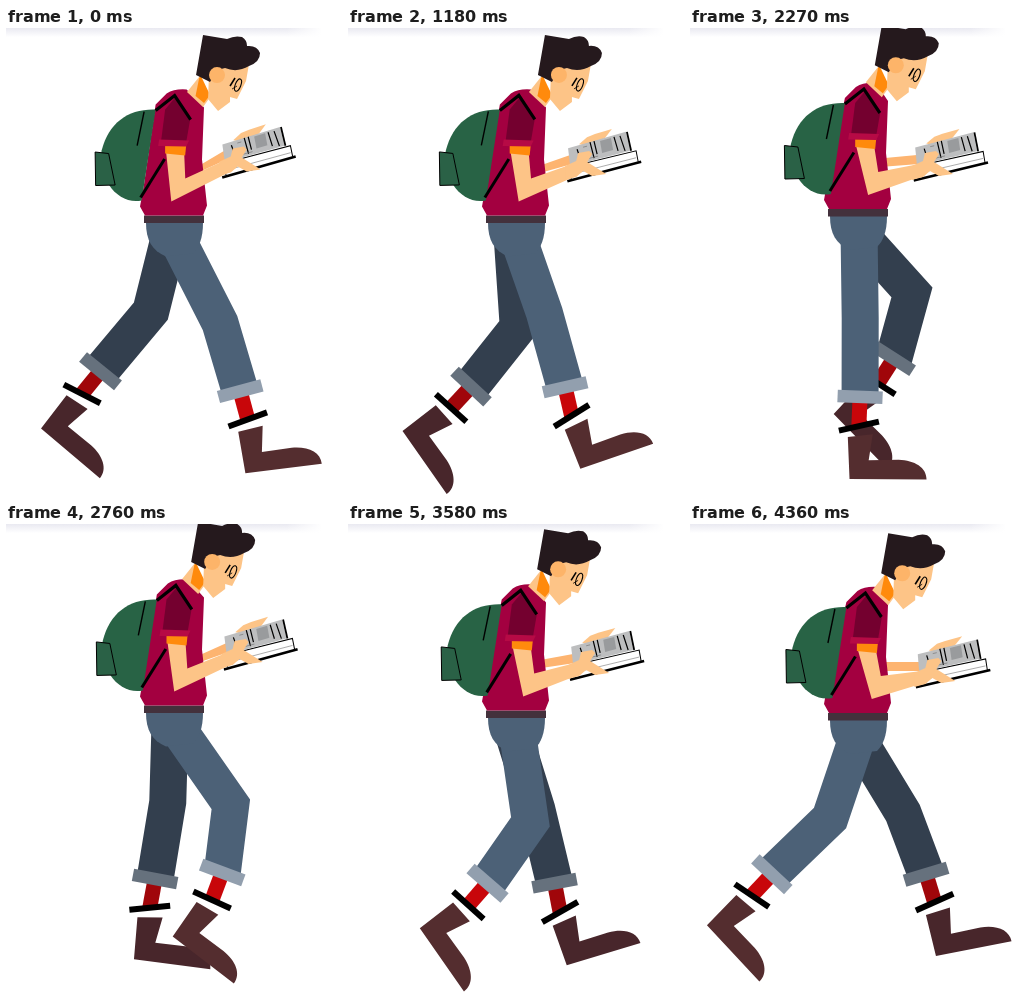
Animation of 336x468 px, one loop 4.39 s. Source, as an HTML page with a canvas:

```html
<!DOCTYPE html>
<html lang="en">
<head>
<meta charset="utf-8">
<title>Walking reader</title>
<style>
  html, body { margin: 0; width: 100%; height: 100%; overflow: hidden; background: #fff; }
  canvas { display: block; width: 336px; height: 468px; }
</style>
</head>
<body>
<canvas id="stage" width="336" height="468"></canvas>
<script>
const ctx = document.getElementById('stage').getContext('2d');
const LOOP = 4390, STRIDE = 952;
const RAD = Math.PI / 180;

// phase, knee x, knee y, cuff x, cuff y, calf angle, foot angle
const STEPS = [
  [0, 214, 295, 234, 363, -15, -7],
  [.08, 218, 289, 241, 350, -17, -11],
  [.204, 200, 285, 224, 359, -15, -21],
  [.26, 194, 285, 212, 359, -11, -17],
  [.286, 186, 285, 200, 358, -6, -11],
  [.384, 170.5, 290, 171, 369, 2, 0],
  [.399, 167, 278, 155, 355, 10, 7],
  [.5, 150, 283, 100, 343, 39, 40],
  [.58, 140, 294, 82, 350, 43, 47],
  [.704, 166, 300, 114, 356, 45, 55],
  [.7605, 182, 298, 139, 359, 41, 55],
  [.786, 198, 293, 165, 357, 38, 54],
  [.884, 227, 264, 208, 330, 33, 46],
  [.899, 225, 280, 216, 348, 21, 38]
];
// half-cycle phase, body drop
const BOB = [[0, 6.5], [.08, 8], [.204, 7.5], [.26, 5.5], [.286, 3.5], [.384, 0], [.399, .4]];

const NEAR = { dx: 0, leg: '#4c6177', cuff: '#929fae', calf: '#c8060a', boot: '#542d2f' };
const FAR = { dx: -5, leg: '#333f4e', cuff: '#66717d', calf: '#a0060a', boot: '#48262b' };
const SKIN = '#fdc487', ORANGE = '#ff8a0c', HAIR = '#25191d';

// smooth periodic interpolation without overshoot
function sample(keys, period, u) {
  u = ((u % period) + period) % period;
  const n = keys.length;
  const key = i => {
    const turn = Math.floor(i / n);
    const k = keys[i - turn * n].slice();
    k[0] += turn * period;
    return k;
  };
  let i = n - 1;
  while (i > 0 && keys[i][0] > u) i--;
  const [a, b, c, d] = [key(i - 1), key(i), key(i + 1), key(i + 2)];
  const w = c[0] - b[0], x = (u - b[0]) / w;
  const slope = (p, q, j) => (q[j] - p[j]) / (q[0] - p[0]);
  const blend = (m, k) => m * k > 0 ? 2 * m * k / (m + k) : 0;
  return b.slice(1).map((v, j) => {
    j++;
    const mid = slope(b, c, j);
    const m0 = blend(slope(a, b, j), mid) * w, m1 = blend(mid, slope(c, d, j)) * w;
    const x2 = x * x, x3 = x2 * x;
    return (2 * x3 - 3 * x2 + 1) * v + (x3 - 2 * x2 + x) * m0
      + (3 * x2 - 2 * x3) * c[j] + (x3 - x2) * m1;
  });
}

function fill(d, color) {
  ctx.fillStyle = color;
  ctx.fill(new Path2D(d));
}
function line(d, width, color = '#000') {
  ctx.strokeStyle = color;
  ctx.lineWidth = width;
  ctx.stroke(new Path2D(d));
}
function group(x, y, angle, draw) {
  ctx.save();
  ctx.translate(x, y);
  ctx.rotate(angle * RAD);
  draw();
  ctx.restore();
}

function leg(side, u, bob) {
  const [kx, ky, ax, ay, calf, foot] = sample(STEPS, 1, u);
  const knee = kx + side.dx, ankle = ax + side.dx;
  const sin = Math.sin(calf * RAD), cos = Math.cos(calf * RAD);
  group(ankle, ay, calf, () => fill('M-7.5 0H7.5V30H-7.5Z', side.calf));
  group(ankle - 29.5 * sin, ay + 29.5 * cos, foot, () => {
    fill('M-11 11L14 8L10 34L40 33.5C56 34 68 41 68 53H-9Z', side.boot);
    group(0, 0, -13, () => fill('M-20.5 -3H20.5V3H-20.5Z', '#000'));
  });
  line(`M${169 + side.dx} ${200 + bob}L${knee} ${ky}L${ankle} ${ay}`, 37, side.leg);
  group(ankle, ay, calf, () => fill('M-22.5 -6H22.5V6.5H-22.5Z', side.cuff));
}

function hips() {
  fill('M140 188H197C197 204 193 213 187 219L160 222C146 216 140 206 140 188Z', NEAR.leg);
  fill('M138 181H198V188.5H138Z', '#43313c');
}

function torso(s) {
  const k = 3.5 * s;
  fill(`M${153 + k} 70L${164 + k} 59Q${172 + k} 54 ${184 + k} 55L198 73L196 125L201 171L197 181H139L134 172L138 150Z`, '#a30040');
}

function pack() {
  fill('M153 75L139 166C115 171 94 143 99 116C106 88 126 74 153 75Z', '#286345');
  fill('M92.5 117.5L106 119L112.5 150.5L93 151Z', '#2a6146');
  line('M92.5 117.5L106 119L112.5 150.5L93 151Z', 1);
  line('M141.500 77L134.500 111', 1.4);
  line('M162 124.500L138 163', 3);
}

function farArm(s) {
  const hx = 5.5 * s, hy = 7.3 * s;
  fill(`M195 130L${224 + hx} ${123 + hy}L${226 + hx} ${132 + hy}L190 139Z`, '#fdb470');
}

function book() {
  fill('M233 112L241 105L249 102L266 97L259 106L243 114Z', SKIN);
  fill('M222 134L290 118L292 130L224 147Z', '#fff');
  line('M222 135L290 119L292 130M222 135L225 147', 1);
  line('M225 142L290 126', .8, '#999');
  line('M221 149L295 130', 2.6);
  fill('M222 116L280 100L284 119L224 134Z', '#bdbebf');
  line('M281 100L285 119', 1.8);
  fill('M254 109L265 106L267 118L256 121Z', '#999b9d');
  line('M231 117L234 126M244 110L248 126M248 109L251 122M268 105L272 119M274 104L279 119', 1.2);
  line('M236 128L252 124M237 115L241 114', .7, '#777');
}

function nearArm(s) {
  const k = 4 * s, e = 8.5 * s, hx = 5.5 * s, hy = 7.3 * s;
  fill(`M${164 + k} 118L${182 + k} 118L${185 + e * .7} 144L${226 + hx} ${132 + hy}L${232 + hx} ${143 + hy}L${173.5 + e} 167Z`, SKIN);
  group(hx, hy, 0, () =>
    fill('M219 134L230 129L232 121L243 119L246 122L241 130L260 142L246 144L237 139L230 145L219 148Z', SKIN));
  group(k, 0, 0, () => {
    fill('M163 111H184L183 121L163 119Z', ORANGE);
    fill('M163 75L173 63L188 85L184 108L159 106Z', '#74002f');
    fill('M157 105L187 106L184 112L156 111.500Z', '#b60a45');
  });
}

function head() {
  fill('M181 64L193 49L205 68L197 79Z', SKIN);
  fill('M194 46L204 67L198 75L189.500 68Z', ORANGE);
  fill('M203 46L220 38L243 36L240 53L233 67L231 71L224 69L224 74L212 83L202 71Z', SKIN);
  fill('M197 7L221 11Q229 7 236 9Q241 12 241 18Q251 17 254 25Q254 34 243 38Q231 45 219 40Q211 40 204 54L190 47Z', HAIR);
  ctx.fillStyle = '#fdb469';
  ctx.beginPath();
  ctx.arc(211, 47, 8, 0, 7);
  ctx.fill();
  line('M224 58L229 50', 1.6);
  ctx.lineWidth = 1.1;
  ctx.beginPath();
  ctx.ellipse(232, 57, 2.8, 6.5, 20 * RAD, 0, 7);
  ctx.stroke();
  line('M226 61L231 58', .8);
}

function ceiling() {
  const g = ctx.createLinearGradient(0, 0, 0, 9);
  g.addColorStop(0, '#e9e9f1');
  g.addColorStop(1, '#ffffff');
  ctx.fillStyle = g;
  ctx.fillRect(0, 0, 316, 9);
  const fade = ctx.createLinearGradient(280, 0, 316, 0);
  fade.addColorStop(0, 'rgba(255,255,255,0)');
  fade.addColorStop(1, '#fff');
  ctx.fillStyle = fade;
  ctx.fillRect(280, 0, 36, 9);
}

function draw(t) {
  const u = t / STRIDE;
  const [bob] = sample(BOB, .5, u);
  const sway = Math.cos(2 * Math.PI * (u - .544));
  ctx.fillStyle = '#fff';
  ctx.fillRect(0, 0, 336, 468);
  ceiling();
  leg(FAR, u + .5, bob);
  leg(NEAR, u, bob);
  group(0, bob, 0, () => {
    hips();
    farArm(sway);
    torso(sway);
    group(3.5 * sway, 0, 0, pack);
  });
  group((bob - 6.5) * .8, (bob - 6.5) * 1.5, 0, head);
  group(0, bob, 0, () => {
    group(258 + 5.5 * sway, 130 + 7.3 * sway, 1.5 * sway, () => group(-258, -130, 0, book));
    nearArm(sway);
    group(3.5 * sway, 0, 0, () => line('M153 76L172 61L188 85', 3.2));
  });
}

const start = performance.now();
function tick() {
  draw((performance.now() - start) % LOOP);
  requestAnimationFrame(tick);
}
tick();
</script>
</body>
</html>
```
